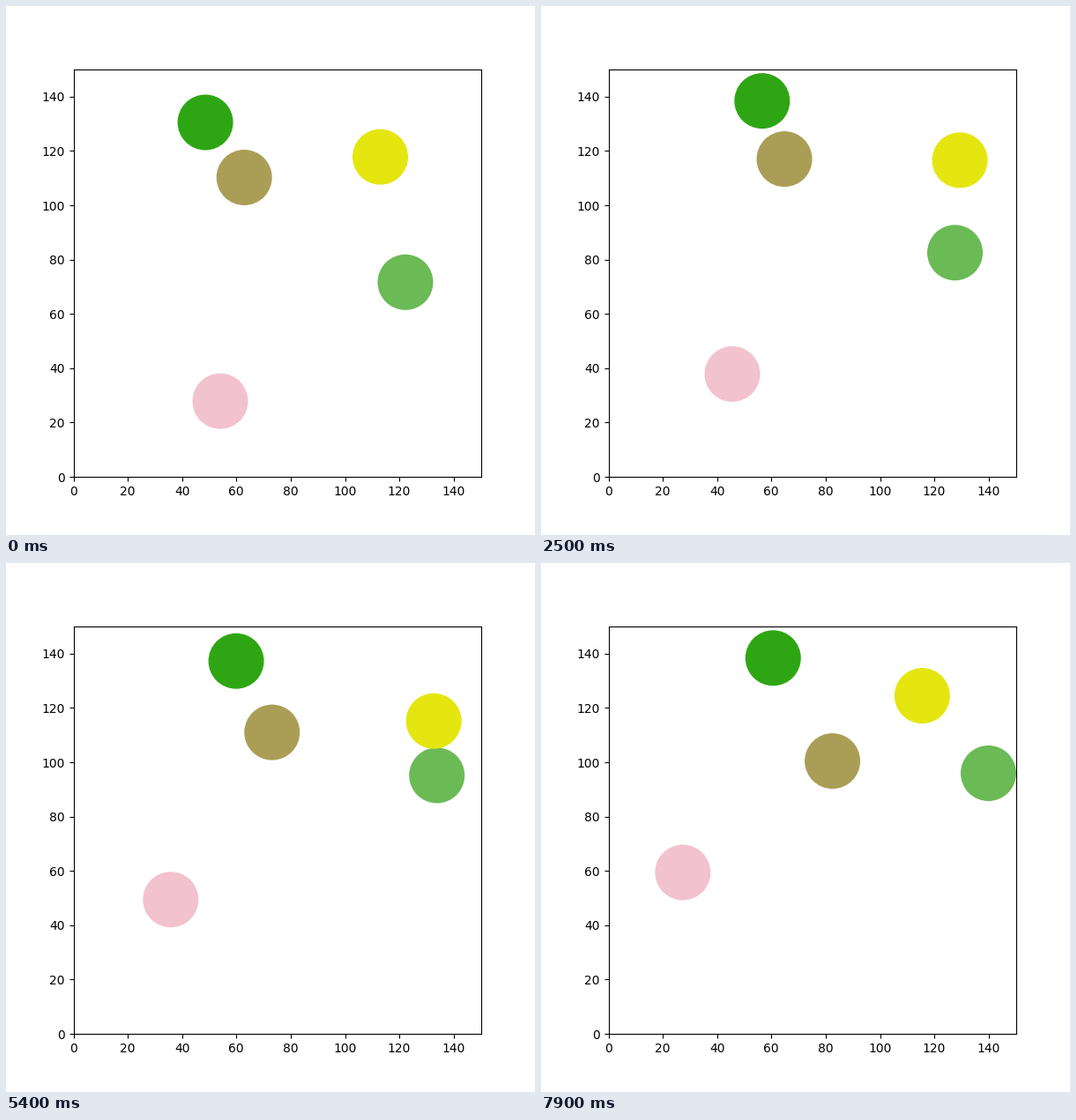
Write a matplotlib script that moves like this. It is 600x600 px and loops after 8 s.

```python
import numpy as np
import matplotlib.pyplot as plt
from matplotlib.animation import FuncAnimation

FRAMES, STEP_MS = 80, 100
SIZE, RADIUS = 150, 10

# Colour, starting point and velocity per frame of each ball.
BALLS = [
    ("#aa9e57", (62.89, 110.23), (0.026, 0.3679)),
    ("#2ea613", (48.571, 130.52), (0.3766, 0.2088)),
    ("#6aba56", (122.24, 71.66), (0.2149, 0.4351)),
    ("#e5e610", (112.99, 117.80), (0.6564, -0.0483)),
    ("#f2c2ce", (54.06, 27.86), (-0.3378, 0.3995)),
]
colors, starts, speeds = zip(*BALLS)


def collide(pos, vel, i, j):
    """Elastic hit of two equal balls: swap the speeds along the line of centres."""
    gap = pos[i] - pos[j]
    dist = np.hypot(*gap)
    normal = gap / dist
    closing = (vel[i] - vel[j]) @ normal
    if dist < 2 * RADIUS and closing < 0:
        vel[i] -= closing * normal
        vel[j] += closing * normal


def step(pos, vel):
    """Move the balls one after another, each bouncing off balls and walls."""
    for i in range(len(pos)):
        pos[i] += vel[i]
        for j in range(len(pos)):
            if j != i:
                collide(pos, vel, i, j)
        outside = (pos[i] < RADIUS) | (pos[i] > SIZE - RADIUS)
        vel[i][outside] *= -1


def simulate():
    pos, vel = np.array(starts), np.array(speeds)
    track = [pos.copy()]
    for _ in range(FRAMES - 1):
        step(pos, vel)
        track.append(pos.copy())
    return track


track = simulate()

fig, ax = plt.subplots(figsize=(6, 6), dpi=100)
ax.set_aspect("equal")
ax.set(xlim=(0, SIZE), ylim=(0, SIZE))
ticks = range(0, SIZE, 20)
ax.set_xticks(ticks)
ax.set_yticks(ticks)
circles = [ax.add_patch(plt.Circle(start, RADIUS, color=color))
           for color, start in zip(colors, starts)]


def update(frame):
    for circle, center in zip(circles, track[frame]):
        circle.center = center
    return circles


anim = FuncAnimation(fig, update, frames=FRAMES, interval=STEP_MS,
                     repeat=True, repeat_delay=0)
plt.show()
```
